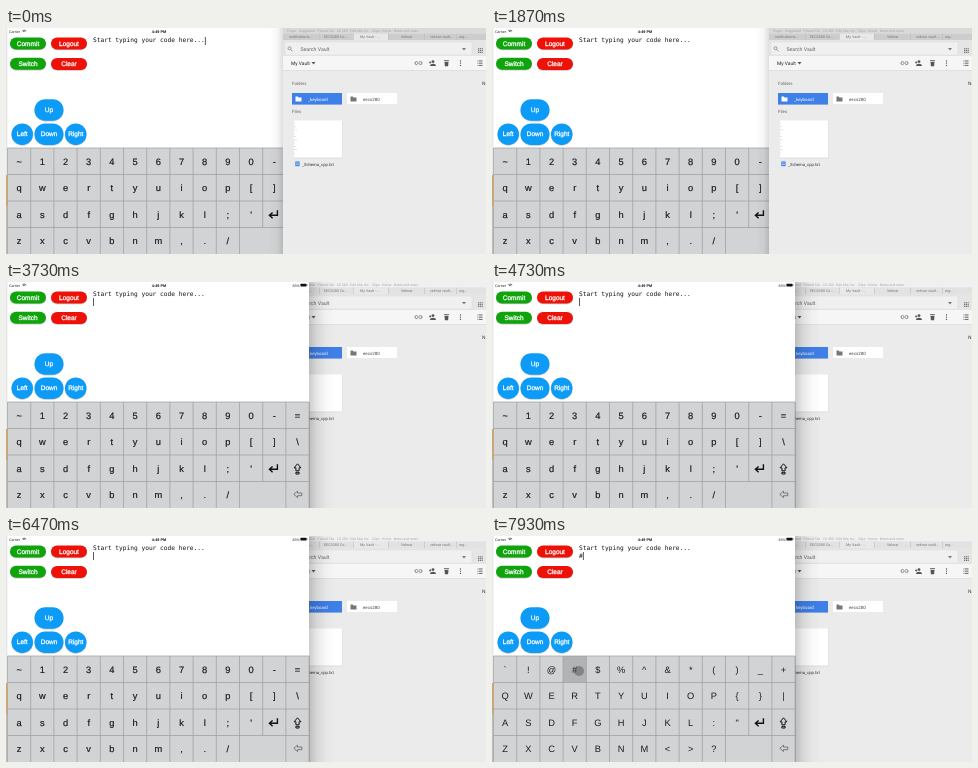
Write an HTML page that moves like this. It is 480x226 px and loops after 8000 ms.

```html
<!DOCTYPE html>
<html lang="en">
<head>
<meta charset="utf-8">
<title>Code keyboard</title>
<style>
html, body { margin: 0; width: 100%; height: 100%; overflow: hidden; background: #ebebeb; }
svg { display: block; width: 480px; height: 226px; }
text { font-family: "Liberation Sans", Arial, sans-serif; white-space: pre; text-rendering: geometricPrecision; }
.mono { font-family: "DejaVu Sans Mono", monospace; }
.ui { font-family: Roboto, sans-serif; }
</style>
</head>
<body>
<svg id="stage" viewBox="0 0 480 226"></svg>
<script>
const NS = 'http://www.w3.org/2000/svg';
const LOOP = 8000;
const ENTER = { down: 2400, up: 2700 };
const SHIFT = { down: 6600, up: 6960 };
const HASH = { down: 7740, up: LOOP };

const stage = document.getElementById('stage');

function el(parent, tag, attrs = {}, content) {
  const node = document.createElementNS(NS, tag);
  for (const k in attrs) node.setAttribute(k, attrs[k]);
  if (content !== undefined) node.textContent = content;
  parent.appendChild(node);
  return node;
}
const rect = (p, x, y, width, height, fill, more) => el(p, 'rect', { x, y, width, height, fill, ...more });
const path = (p, d, more) => el(p, 'path', { d, fill: 'none', ...more });
const label = (p, x, y, size, fill, str, more) => el(p, 'text', { x, y, 'font-size': size, fill, ...more }, str);
const center = { 'text-anchor': 'middle' };
const show = (node, on) => node.setAttribute('visibility', on ? 'visible' : 'hidden');

function fade(defs, id, stops) {
  const g = el(defs, 'linearGradient', { id });
  stops.forEach(([offset, opacity]) => el(g, 'stop', { offset, 'stop-color': '#000', 'stop-opacity': opacity }));
}

const defs = el(stage, 'defs');
fade(defs, 'rightShade', [[0, .2], [.3, .09], [.65, .025], [1, 0]]);
fade(defs, 'leftShade', [[0, 0], [.6, .03], [1, .13]]);

const desktop = el(stage, 'g');
rect(desktop, 0, 0, 4, 226, '#e6e8ea');
rect(desktop, 0, 147, 4, 31, '#dfa050');
rect(desktop, 0, 178, 4, 48, '#c3bcb2');

const browser = el(stage, 'g');
const app = el(stage, 'g');

// Browser window
function buildBrowser(g) {
  const ui = { class: 'ui' };
  rect(g, 277, 0, 203, 226, '#ebebeb');
  const bar = rect(g, 277, 0, 203, 5.5, '#d9d9d9');
  const tabs = rect(g, 277, 5.5, 203, 6.5, '#cdcdcd');
  label(g, 281, 3.6, 3.4, '#a6a6a6', 'Pages   Suggested   Pinned Tab   CS 280   Edit Site, Inc.   Clips - Home   Notes and news', ui);
  rect(g, 347, 5.5, 35, 6.5, '#e8e8e8');
  [[283, 'notifications...'], [318, 'EECS280 Co...'], [354, 'My Vault - ...'], [395, 'Velmar'], [424, 'velmar vault...'], [453, 'org...']]
    .forEach(([x, s]) => label(g, x, 10.3, 3.7, '#777', s, ui));
  [313, 347, 382, 418, 450].forEach(x => rect(g, x, 5.5, .5, 6.5, '#b8b8b8'));

  rect(g, 277, 12, 203, 16, '#e5e5e5');
  rect(g, 279, 14, 187, 13, '#f0f0f0', { stroke: '#dadada', 'stroke-width': .5 });
  el(g, 'circle', { cx: 283.5, cy: 20.2, r: 1.5, fill: 'none', stroke: '#777', 'stroke-width': .7 });
  path(g, 'M284.6 21.4l1.9 1.9', { stroke: '#777', 'stroke-width': .8 });
  label(g, 294.5, 22.8, 5.2, '#666', 'Search Vault', ui);
  path(g, 'M456 20h4l-2 2.4z', { fill: '#777' });

  rect(g, 277, 28, 203, 14.5, '#f6f6f6');
  rect(g, 277, 42.3, 203, .7, '#dadada');
  label(g, 285, 36.8, 4.9, '#222', 'My Vault', ui);
  path(g, 'M305.5 34h4l-2 2.4z', { fill: '#555' });

  const ink = { stroke: '#666', 'stroke-width': .8 };
  path(g, 'M411.5 33.6h-1a1.5 1.5 0 0 0 0 3h1M413.5 33.6h1a1.5 1.5 0 0 1 0 3h-1M411 35.1h3', ink);
  el(g, 'circle', { cx: 427, cy: 33.6, r: 1.4, fill: '#555' });
  path(g, 'M424 38c0-3 6-3 6 0zM423 34h.8v-1h.7v1h.8v.7h-.8v1h-.7v-1H423z', { fill: '#555' });
  path(g, 'M438.5 33.7h4l-.4 4.6h-3.2zM438 32.3h5v.8h-5z', { fill: '#555' });
  [33, 35.2, 37.4].forEach((y, i) => {
    el(g, 'circle', { cx: 454.5, cy: y, r: .65, fill: '#555' });
    rect(g, 471.5, y - .5, .9, .9, '#555');
    rect(g, 473, y - .5, 3.5, .9, '#555');
    for (let c = 0; c < 3; c++) rect(g, 472 + c * 1.8, 20.2 + i * 1.8, 1.2, 1.2, '#777');
  });

  label(g, 286, 57, 4.4, '#666', 'Folders', ui);
  label(g, 476, 57, 4.8, '#444', 'Name', ui);
  folder(g, 286, '#3f7fe8', '#fff', '#fff', '_keyboard');
  folder(g, 341, '#fff', '#777', '#444', 'eecs280');
  label(g, 286, 85, 4.4, '#666', 'Files', ui);

  rect(g, 288, 93, 48.5, 37.5, '#dedede');
  rect(g, 288, 92.5, 48, 37, '#fff');
  for (let i = 0; i < 10; i++) rect(g, 288, 95 + i * 3.3, 1 + i * 7 % 3, .8, '#ddd');
  rect(g, 289.3, 133.4, 4.3, 4.8, '#4a86e8');
  path(g, 'M290.2 135h2.5M290.2 136.5h2.5', { stroke: '#fff', 'stroke-width': .5 });
  label(g, 296, 137.6, 4.2, '#333', '_Schema_cpp.txt', ui);
  return { bar, tabs };
}

function folder(g, x, fill, icon, ink, name) {
  rect(g, x, 65.5, 50, 11.5, '#d8d8d8');
  rect(g, x, 65, 50, 11.5, fill);
  path(g, `M${x + 3.5} 68.6h2.2l.8.9h3v4h-6z`, { fill: icon });
  label(g, x + 16, 72.5, 4.4, ink, name, { class: 'ui' });
}

// Keyboard app window
const COL = 23.2, ROW = 26.5, LEFT = 1.5, TOP = 120;
const PLAIN = ['~1234567890-=', 'qwertyuiop[]\\', "asdfghjkl;'", 'zxcvbnm,./'];
const UPPER = ['`!@#$%^&*()_+', 'QWERTYUIOP{}|', 'ASDFGHJKL:"', 'ZXCVBNM<>?'];
const keyX = c => LEFT + c * COL;
const keyY = r => TOP + r * ROW;

function pill(g, x, y, w, h, fill, str) {
  const rx = h / 2, size = 6.5;
  rect(g, x, y + .8, w, h, '#000', { rx, opacity: .22 });
  rect(g, x, y, w, h, fill, { rx });
  label(g, x + w / 2, y + h / 2 + size * .36, size, '#fff', str, { ...center, stroke: '#fff', 'stroke-width': .28 });
}

function layer(g, rows, size, weight) {
  const ink = '#1c1c1c';
  const out = el(g, 'g', { stroke: ink, 'stroke-width': weight });
  rows.forEach((row, r) => [...row].forEach((ch, c) =>
    label(out, keyX(c) + COL / 2, keyY(r) + 16.7, size, ink, ch, center)));
  return out;
}

function buildApp(g) {
  rect(g, 1.5, 0, 301.5, 226, '#fff');
  label(g, 3, 4.5, 3.6, '#222', 'Carrier');
  path(g, 'M16.2 2.8q2-1.6 4 0M17 3.7q1.2-.9 2.4 0', { stroke: '#222', 'stroke-width': .6 });
  label(g, 153, 4.6, 3.8, '#111', '4:49 PM', { ...center, 'font-weight': 'bold' });
  label(g, 286.5, 4.5, 3.6, '#222', '83%');
  rect(g, 294.5, 1.7, 6, 2.9, '#111', { rx: .6 });
  rect(g, 300.8, 2.5, .5, 1.3, '#111');

  const green = '#10a40c', red = '#ee1108', blue = '#0d9bf8';
  pill(g, 4, 9.5, 36, 12, green, 'Commit');
  pill(g, 45, 9.5, 36, 12, red, 'Logout');
  pill(g, 4, 29.8, 36, 12, green, 'Switch');
  pill(g, 45, 30, 36, 12, red, 'Clear');
  pill(g, 28.5, 71.2, 29, 21.5, blue, 'Up');
  pill(g, 5.5, 95.4, 21.5, 21.5, blue, 'Left');
  pill(g, 28.5, 95.4, 29, 21.5, blue, 'Down');
  pill(g, 59, 95.4, 21.5, 21.5, blue, 'Right');

  const mono = { class: 'mono' };
  label(g, 87, 14.4, 6.2, '#111', 'Start typing your code here...', mono);
  const typed = label(g, 87, 22, 6.2, '#111', '#', mono);
  const caret = rect(g, 87, 9, .8, 8, '#333');

  rect(g, LEFT, TOP, COL * 13, 106, '#d2d3d5');
  const press = (c, r, fill) => rect(g, keyX(c), keyY(r), COL, ROW, fill);
  const enterKey = press(11, 2, '#c4c5c6');
  const shiftKey = press(12, 2, '#a9aaab');
  const hashKey = press(3, 0, '#b2b3b5');

  let d = '';
  for (let r = 0; r < 4; r++) d += `M${LEFT} ${keyY(r)}H303`;
  for (let c = 0; c < 14; c++) d += `M${keyX(c)} ${TOP}V${c === 11 ? keyY(3) : 226}`;
  path(g, d, { stroke: '#9b9c9e', 'stroke-width': .7 });

  const plain = layer(g, PLAIN, 9.3, .2), upper = layer(g, UPPER, 9.3, 0);
  const enter = path(g, 'M271.4 182.3V187.3H264M266.6 184.4L263.4 187.3L266.6 190.2', { 'stroke-width': 1.4 });
  path(g, 'M291.5 181.8l3.4 4h-1.8v3h-3.2v-3h-1.8zM289.9 190.3h3.2v1.7h-3.2z', { stroke: '#111', 'stroke-width': 1 });
  path(g, 'M287.8 212.3l3.7-3.1v1.8h4.3v2.7h-4.3v1.8z', { stroke: '#555', 'stroke-width': .7 });
  const touch = el(g, 'circle', { cx: 87, cy: 135, r: 5, fill: '#555', opacity: .5 });
  return { typed, caret, enterKey, shiftKey, hashKey, plain, upper, enter, touch };
}

const chrome = buildBrowser(browser);
const ui = buildApp(app);
const browserShade = rect(browser, 263, 0, 14, 226, 'url(#leftShade)');
const appShade = rect(app, 303, 0, 26, 226, 'url(#rightShade)');

const held = (t, key) => t >= key.down && t < key.up;
let front = null;

function setFront(appFront) {
  if (front === appFront) return;
  front = appFront;
  stage.appendChild(appFront ? app : browser);
  show(browserShade, !appFront);
  show(appShade, appFront);
  chrome.bar.setAttribute('fill', appFront ? '#f0f0f0' : '#d9d9d9');
  chrome.tabs.setAttribute('fill', appFront ? '#e2e2e2' : '#cdcdcd');
}

function draw(t) {
  const newline = t >= ENTER.down;
  const hash = t >= HASH.down;
  const shifted = t >= SHIFT.down;
  setFront(newline);

  const blinkFrom = hash ? HASH.down : newline ? ENTER.down : 0;
  show(ui.caret, (t - blinkFrom) % 1000 < 500);
  ui.caret.setAttribute('x', hash ? 90.9 : newline ? 87 : 198.9);
  ui.caret.setAttribute('y', newline ? 16 : 9);
  show(ui.typed, hash);

  show(ui.plain, !shifted);
  show(ui.upper, shifted);
  show(ui.enterKey, held(t, ENTER));
  show(ui.shiftKey, held(t, SHIFT));
  show(ui.hashKey, hash);
  show(ui.touch, hash);
  ui.enter.setAttribute('stroke', held(t, ENTER) ? '#97989a' : '#111');
}

function tick() {
  draw(performance.now() % LOOP);
  requestAnimationFrame(tick);
}
tick();
</script>
</body>
</html>
```
